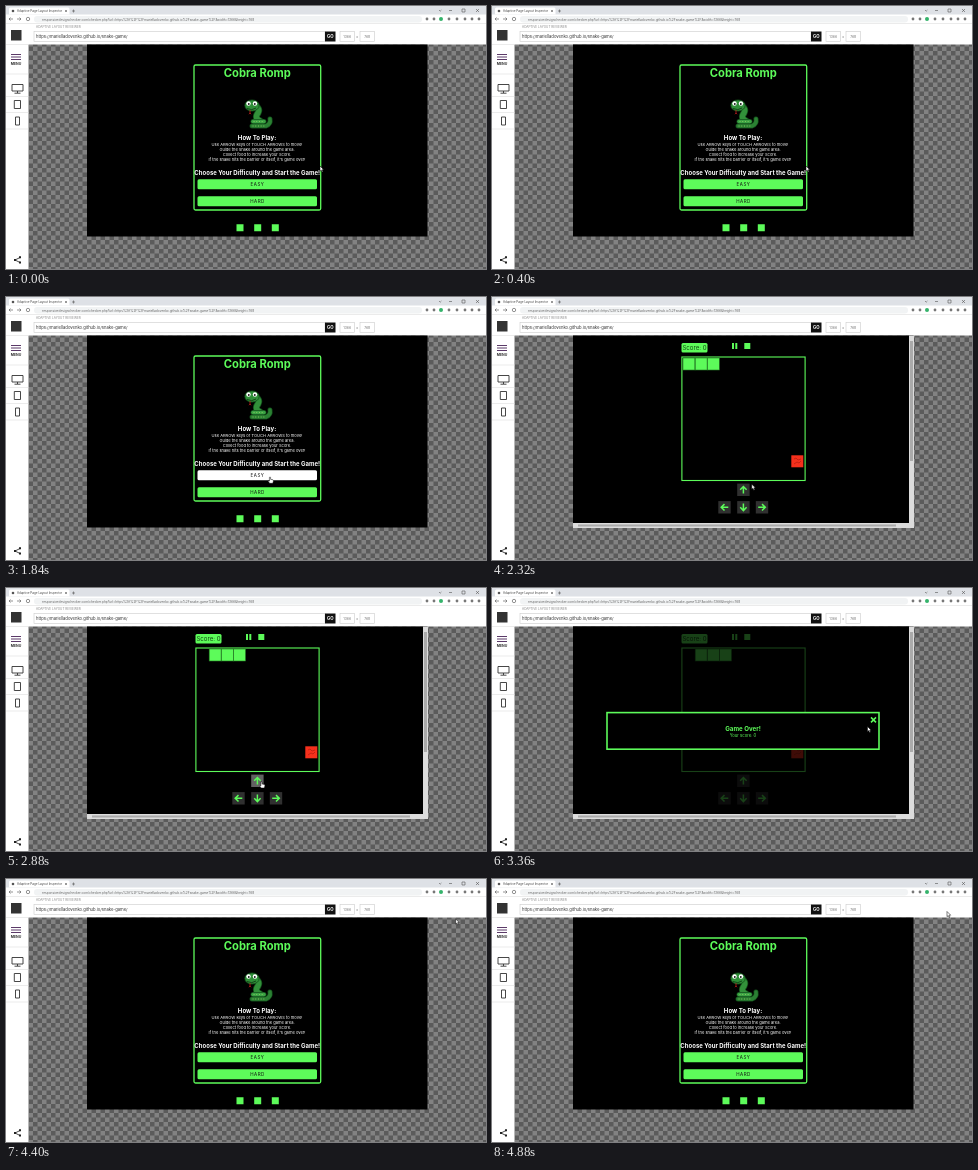
An HTML page that plays this animation: 480 by 263 pixels, repeating every 4960 ms.

```html
<!DOCTYPE html>
<html lang="en">
<head>
<meta charset="utf-8">
<title>Cobra Romp</title>
<style>
  html, body { margin: 0; height: 100%; overflow: hidden; background: #fff; }
  svg { display: block; width: 100vw; height: 100vh; }
  text { font-family: Inter, Roboto, sans-serif; }
  .mid { text-anchor: middle; }
  .bold { font-weight: 700; }
  .green { fill: #5dfb5a; }
  .line { fill: none; stroke: #5dfb5a; }
  .ink { fill: none; stroke: #333; stroke-width: .9; }
  .rule { stroke: #ddd; stroke-width: .6; }
  .field { fill: #fff; stroke: #ccc; stroke-width: .6; }
</style>
</head>
<body>
<svg viewBox="0 0 480 263" preserveAspectRatio="none">
  <defs>
    <pattern id="checker" width="9" height="9" patternUnits="userSpaceOnUse">
      <path fill="#828282" d="M0 0h9v9H0z"/>
      <path fill="#5b5b5b" d="M0 0h4.5v9H9V4.5H0z"/>
    </pattern>
    <path id="arrow" fill="none" stroke="#5dfb5a" stroke-width="1.5" d="M0 3.8V-3.2M-3.2 0L0 -3.3L3.2 0"/>
  </defs>

  <rect width="480" height="263" fill="url(#checker)"/>

  <!-- browser -->
  <path fill="#fff" d="M0 0h480v38.5H22.5V263H0z"/>
  <path fill="#dee1e6" d="M0 0h480v8.5H0z"/>
  <path fill="#fff" d="M3 8.5V3q0-1.5 1.5-1.5H62q1.5 0 1.5 1.5v5.5z"/>
  <circle cx="7" cy="5" r="1.3" fill="#555"/>
  <text x="11" y="6.2" font-size="3" fill="#444">Adaptive Page Layout Inspector</text>
  <path stroke="#555" stroke-width=".6" fill="none" d="M59 4l2 2m0-2l-2 2M66 5h3m-1.5-1.5v3M433 4l1.2 1.2L435.4 4M443 4.5h3M456 3h3v3h-3zM470 3l3 3m0-3l-3 3"/>
  <rect x="28" y="10" width="388" height="6.5" rx="3.2" fill="#f1f3f4"/>
  <path stroke="#666" stroke-width=".7" fill="none" d="M7 13H3m1.5-1.5L3 13l1.5 1.5M11 13h4m-1.5-1.5L15 13l-1.5 1.5"/>
  <circle cx="22" cy="13" r="1.7" fill="none" stroke="#666" stroke-width=".7"/>
  <text id="address" x="36" y="14.5" font-size="3.2" fill="#666"></text>
  <g id="extensions"></g>
  <path class="rule" d="M0 17.5h480"/>

  <!-- checker header -->
  <text x="30" y="22" font-size="3.1" fill="#888">ADAPTIVE LAYOUT REVIEWER</text>
  <rect class="field" x="28" y="25.5" width="291" height="10"/>
  <text id="site" x="30" y="32.3" font-size="4.15" fill="#333"></text>
  <rect x="319" y="25.5" width="10.5" height="10" fill="#111"/>
  <text class="mid bold" x="324.2" y="32.2" font-size="4.3" fill="#fff">GO</text>
  <rect class="field" x="334" y="25.5" width="14.5" height="10"/>
  <rect class="field" x="354" y="25.5" width="14.5" height="10"/>
  <g class="mid" font-size="3.4" fill="#777">
    <text x="341.2" y="31.8">1366</text><text x="351.3" y="31.8">x</text><text x="361.2" y="31.8">768</text>
  </g>

  <!-- sidebar -->
  <rect x="5" y="24" width="10.5" height="10.5" fill="#333"/>
  <path class="rule" d="M0 38.5h22.5M0 68h22.5M0 90.5h22.5M0 106.5h22.5M0 123h22.5"/>
  <path stroke="#5b3a68" d="M5 48.5h10M5 51h10M5 53.5h10"/>
  <text class="mid bold" x="10" y="59" font-size="3.5" fill="#333">MENU</text>
  <path class="ink" d="M6 78.5h11v6.5H6zM11.5 85v2M8.5 87.2h6M8.3 94.5h6.2v8H8.3zM9.5 111h4v8h-4zM14 251.5l-5 2.5 5 2.5"/>
  <path d="M13 250.3h2v2h-2zM8 253h2v2H8zM13 255.5h2v2h-2z" fill="#222"/>

  <rect x="81" y="38.5" width="340.5" height="192" fill="#000"/>

  <g id="menu">
    <rect class="line" x="188" y="59" width="126.7" height="145" rx="1.5" stroke-width="1.3"/>
    <text class="mid bold green" x="251.3" y="70.5" font-size="11.2">Cobra Romp</text>
    <g fill="none" stroke-linecap="round">
      <path stroke="#124d1a" stroke-width="7" d="M246 99Q255 101 252 107Q248 112 254 115"/>
      <path stroke="#32913a" stroke-width="5.4" d="M246 99Q255 101 252 107Q248 112 254 115"/>
      <path stroke="#124d1a" stroke-width="5" d="M246 120H260Q265 118 264 113"/>
      <path stroke="#2b8133" stroke-width="3.6" d="M246 120H260Q265 118 264 113"/>
      <path stroke="#124d1a" stroke-width="5" d="M247 115.5H258"/>
      <path stroke="#3ba344" stroke-width="3.6" d="M247 115.5H258"/>
      <path stroke="#8acb62" stroke-width="1" stroke-dasharray=".1 2.6" d="M247 120H260M248 115.5H257"/>
    </g>
    <ellipse cx="246" cy="99.5" rx="7.2" ry="5.6" fill="#2f8f38" stroke="#124d1a" stroke-width=".8"/>
    <path d="M241 102.5q5 2.5 9 -.5" fill="none" stroke="#0d3512" stroke-width=".8"/>
    <path d="M244 104v3l-1 1.2m1-1.2l1 1.2" fill="none" stroke="#d22" stroke-width=".7"/>
    <g fill="#fff"><circle cx="242.5" cy="97.5" r="2.2"/><circle cx="249" cy="97.5" r="2.2"/></g>
    <g fill="#111"><circle cx="242.8" cy="98" r=".9"/><circle cx="248.8" cy="98" r=".9"/></g>
    <g class="mid" fill="#fff">
      <text class="bold" x="251" y="133.8" font-size="6.1">How To Play:</text>
      <g font-size="4.05">
        <text x="251" y="139.7">Use ARROW keys or TOUCH ARROWS to move!</text>
        <text x="251" y="144.7">Guide the snake around the game area.</text>
        <text x="251" y="149.6">Collect food to increase your Score.</text>
        <text x="251" y="154.5">If the snake hits the barrier or itself, it's game over!</text>
      </g>
      <text class="bold" x="251.2" y="168.6" font-size="6">Choose Your Difficulty and Start the Game!</text>
    </g>
    <rect id="easy" x="191.5" y="173.3" width="119.5" height="10" rx="1.5"/>
    <rect class="green" x="191.5" y="190.3" width="119.5" height="10" rx="1.5"/>
    <g class="mid" font-size="4.5" letter-spacing=".5" fill="#111">
      <text x="251.5" y="180">EASY</text><text x="251.5" y="197">HARD</text>
    </g>
    <path class="green" d="M230.5 218.3h7v7h-7zM248.2 218.3h7v7h-7zM265.8 218.3h7v7h-7z"/>
  </g>

  <g id="game">
    <path fill="#dcdcdc" d="M417 38.5h5V231H81v-5h336z"/>
    <path fill="#aaa" d="M418 44h3v120h-3zM86 227.5h318v2H86z"/>
    <rect class="green" x="189.5" y="46" width="26" height="9.5" rx="1.5"/>
    <text class="mid" x="202.5" y="53.1" font-size="6.1" fill="#124712">Score: 0</text>
    <path class="green" d="M240 46h2v6h-2zM243.3 46h2v6h-2zM252.3 46h6v6h-6z"/>
    <rect class="line" x="189.9" y="60" width="123.2" height="123.5" stroke-width="1.1"/>
    <g id="snake" class="green" stroke="#237a23" stroke-width=".6"></g>
    <rect x="299.3" y="158.3" width="12" height="12" fill="#f5301c"/>
    <path stroke="#a31a10" stroke-width=".6" fill="none" d="M302 162l2-1 2 2 3-1M302 167l3-2 2 1 2-2"/>
    <g id="pad"></g>
  </g>

  <g id="over">
    <rect x="81" y="38.5" width="336" height="187.5" opacity=".74"/>
    <rect class="line" x="115" y="124.6" width="272" height="36.6" fill="#000" stroke-width="1.6" style="fill:#000"/>
    <text class="mid bold green" x="251" y="143" font-size="6.2">Game Over!</text>
    <text class="mid green" x="251" y="148.8" font-size="4.2">Your score: 0</text>
    <path class="line" stroke-width="1.5" d="M379 129.4l5 5m0-5l-5 5"/>
  </g>

  <g id="cursor" fill="#fff" stroke="#000" stroke-width=".5" stroke-linejoin="round">
    <path id="pointer" d="M0 0V5.2L1.2 4.1L2.1 6L3 5.6L2.1 3.7H3.7z"/>
    <path id="hand" d="M-.6 0Q0-.6.6 0V2L3 2.5Q3.6 2.8 3.4 4L2.8 6H-.4L-2 3.8Q-1.9 3-.6 3.8z"/>
  </g>
</svg>
<script>
const LOOP = 4960, STEP = 80;
const GAME_START = 1920, SNAKE_MOVE = 2480, GAME_OVER = 3040, GAME_END = 3840;
const CELL = 12.2, GREEN = '#5dfb5a';
const $ = id => document.getElementById(id);
const show = (id, on) => $(id).setAttribute('display', on ? 'inline' : 'none');

const host = 'marielladovenko.github.io';
$('site').textContent = `https://${host}/snake-game/`;
$('address').textContent =
  `responsivedesignchecker.com/checker.php?url=https%3A%2F%2F${host}%2Fsnake-game%2F&width=1366&height=768`;

$('extensions').innerHTML = [421, 428, 435, 443, 451, 459, 466, 473].map((x, i) =>
  `<circle cx="${x}" cy="13" r="${i === 2 ? 2 : 1.4}" fill="${i === 2 ? '#35b36b' : '#777'}"/>`).join('');

$('snake').innerHTML = [0, 1, 2].map(i =>
  `<rect x="${191 + i * CELL}" y="61" width="${CELL - .3}" height="12"/>`).join('');

$('pad').innerHTML = [[251.4, 192.8, 0], [232.5, 210.3, -90], [251.4, 210.3, 180], [270, 210.3, 90]]
  .map(([x, y, turn]) => `<g transform="translate(${x} ${y})">
    <rect x="-6.2" y="-6.2" width="12.4" height="12.4" fill="#303030"/>
    <use href="#arrow" transform="rotate(${turn})"/></g>`).join('');
const upKey = $('pad').querySelector('rect');

// time, x, y of the cursor tip
const path = [
  [0, 314, 160], [1120, 314, 160], [1440, 264, 180.3], [2080, 264, 180.3],
  [2560, 255.5, 194], [2960, 255.5, 194], [3360, 375.5, 138.5],
  [3680, 382, 132.5], [4000, 382, 132.5], [4480, 455, 32.5], [LOOP, 455, 32.5]
];

function cursorAt(t) {
  const i = path.findIndex(point => point[0] > t);
  const [t0, x0, y0] = path[i - 1], [t1, x1, y1] = path[i];
  const p = (t - t0) / (t1 - t0), ease = p * p * (3 - 2 * p);
  return [x0 + (x1 - x0) * ease, y0 + (y1 - y0) * ease];
}

function render(now) {
  const t = Math.floor(now % LOOP / STEP) * STEP;
  const playing = t >= GAME_START && t < GAME_END;
  const over = playing && t >= GAME_OVER;
  const [x, y] = cursorAt(t);
  const onEasy = !playing && x > 191 && x < 311 && y > 173 && y < 184;
  const onUp = playing && !over && Math.abs(x - 251.4) < 6.2 && Math.abs(y - 192.8) < 6.2;
  const onClose = over && x > 378 && y < 136;

  show('menu', !playing);
  show('game', playing);
  show('over', over);
  $('easy').setAttribute('fill', onEasy ? '#fff' : GREEN);
  upKey.setAttribute('fill', onUp ? '#626262' : '#303030');
  $('snake').setAttribute('transform', `translate(${t >= SNAKE_MOVE ? CELL : 0} 0)`);

  show('cursor', t < 640 || t >= 1200);
  $('cursor').setAttribute('transform', `translate(${x} ${y})`);
  const hand = onEasy || onUp || onClose;
  show('hand', hand);
  show('pointer', !hand);
}

function tick() {
  render(performance.now());
  requestAnimationFrame(tick);
}
tick();
</script>
</body>
</html>
```
